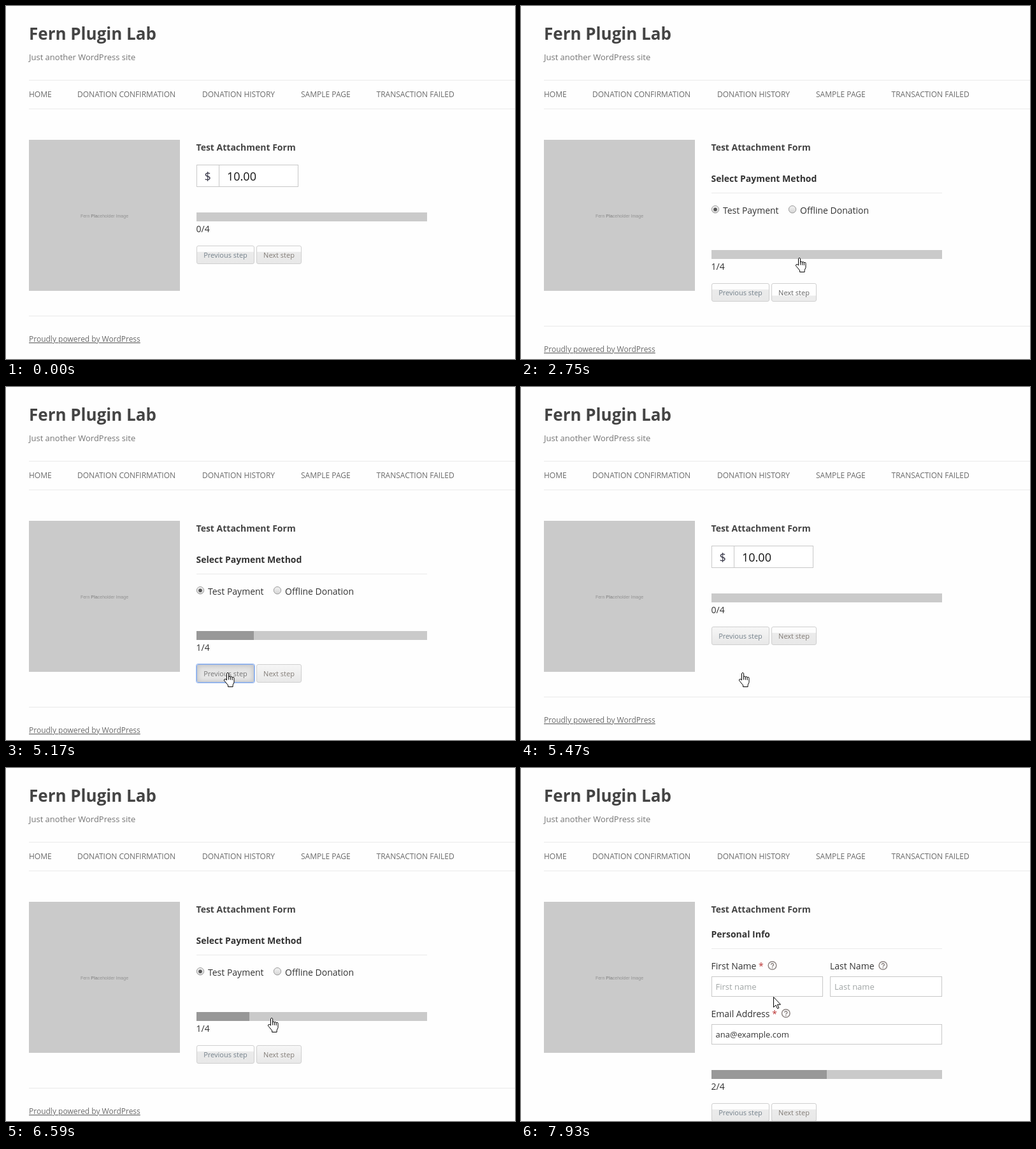
An HTML page that plays this animation: 799 px wide and 554 px high, repeating every 8 s.

```html
<!DOCTYPE html>
<html lang="en">
<head>
<meta charset="utf-8">
<title>Multi-step donation form</title>
<style>
:root {
  --idle: linear-gradient(#fdfdfd 31%, #ebebeb 34%, #e8e8e8);
  --lit: linear-gradient(#fefefe 67%, #ececec 70%);
  --hover: linear-gradient(#f6f6f6, #e8e8e8);
  --down: linear-gradient(#e1e1e1, #ebebeb);
  --ring: 0 0 0 1px #a4c0f0, inset 0 0 7px 2px #c6c6c6;
}
html, body { margin: 0; width: 100%; height: 100%; overflow: hidden; background: #fefefe; }
body { position: relative; font-family: "Open Sans", sans-serif; }
svg { position: absolute; left: 0; top: 0; overflow: visible; }
text { font-size: 14px; fill: #333; white-space: pre; }
line { stroke: #eaeaea; }
.title { font-size: 26px; font-weight: 700; fill: #444; }
.tagline { font-size: 13px; fill: #757575; }
.nav text, .foot { font-size: 12px; fill: #6a6a6a; }
.foot { text-decoration: underline; }
.bold { font-weight: 700; }
.amount { font-size: 18px; fill: #111; }
.field { fill: #fff; stroke: #c8c8c8; }
.value { font-size: 13px; }
.hint { font-size: 13px; fill: #a0a5a5; }
.req { fill: #b33; }
.tip { fill: none; stroke: #8d8583; stroke-width: 1.5; }

/* Every change is a hard cut over one 8 s loop */
.page, .controls, .fill, .btn, .cursor, .cursor g { animation: 8s step-end infinite; }
.page { opacity: 0; }
.amount-page { animation-name: amountPage; }
.method-page { animation-name: methodPage; }
.info-page { animation-name: infoPage; }
@keyframes amountPage { 0%, 66.5% { opacity: 1 } 34.375%, 80.875% { opacity: 0 } }
@keyframes methodPage { 0%, 66.5%, 92.25% { opacity: 0 } 34.375%, 80.875% { opacity: 1 } }
@keyframes infoPage { 0% { opacity: 0 } 92.25% { opacity: 1 } }

.controls { position: absolute; left: 299px; top: 324px; animation-name: shift; }
@keyframes shift {
  0%, 66.5% { transform: none }
  34.375%, 80.875% { transform: translateY(59px) }
  92.25% { transform: translateY(150px) }
}
.bar { width: 362px; height: 14px; background: #cacaca; }
.fill { height: 100%; width: 0; background: #989898; animation-name: progress; }
@keyframes progress {
  0%, 34.375%, 68.375%, 80.875% { width: 0 }
  35.875%, 82.375% { width: 83px }
  37.75%, 84% { width: 90px }
  66.5% { width: 26px }
  92.25% { width: 96px }
  94.125% { width: 173px }
  95.625% { width: 181px }
}
.btn {
  position: absolute; top: 52px; height: 29px; box-sizing: border-box;
  border: 1px solid #cfcfcf; border-radius: 3px; background: var(--idle);
  color: #7c7c7c; font-size: 11px; line-height: 27px; text-align: center; white-space: nowrap;
}
.prev { left: 0; width: 91px; color: #74818b; animation-name: prev; }
.next { left: 94px; width: 71px; color: #827c76; animation-name: next; }
@keyframes prev {
  0%, 23.875%, 80.875% { background: var(--idle); color: #74818b; border-color: #cfcfcf; box-shadow: none }
  17.375%, 56.125% { background: var(--hover); color: #5e6670; border-color: #cfcfcf; box-shadow: none }
  34.375% { background: var(--idle); color: #74818b; border-color: #cfcfcf; box-shadow: none }
  64.625% { background: var(--down); color: #757575; border-color: #86abea; box-shadow: var(--ring) }
  66.5% { background: var(--hover); color: #74818b; border-color: #cfcfcf; box-shadow: none }
}
@keyframes next {
  0%, 66.5%, 92.25% { background: var(--idle); color: #827c76; border-color: #cfcfcf; box-shadow: none }
  23.875%, 77.125%, 85.5% { background: var(--hover); color: #5e5e5e; border-color: #cfcfcf; box-shadow: none }
  34.375% { background: var(--lit); color: #666; border-color: #cfcfcf; box-shadow: none }
  35.875%, 80.875% { background: var(--hover); color: #827c76; border-color: #cfcfcf; box-shadow: none }
  79%, 90.75% { background: var(--down); color: #827c76; border-color: #86abea; box-shadow: var(--ring) }
}

.cursor { animation-name: move; }
@keyframes move {
  0% { transform: translate(385px, 600px) }
  10.5% { transform: translate(385px, 487px) }
  12% { transform: translate(380px, 471px) }
  13.5% { transform: translate(375px, 456px) }
  15.375% { transform: translate(368px, 401px) }
  17.375% { transform: translate(374px, 402px) }
  22.25% { transform: translate(398px, 396px) }
  23.875% { transform: translate(417px, 397px) }
  25.375% { transform: translate(434px, 399px) }
  27.125% { transform: translate(435px, 398px) }
  29.125% { transform: translate(436px, 395px) }
  50.125% { transform: translate(430px, 399px) }
  51.625% { transform: translate(413px, 411px) }
  53.125% { transform: translate(391px, 425px) }
  54.625% { transform: translate(369px, 437px) }
  56.125% { transform: translate(354px, 445px) }
  57.625% { transform: translate(347px, 448px) }
  72.25% { transform: translate(347px, 424px) }
  74.125% { transform: translate(361px, 416px) }
  75.625% { transform: translate(391px, 403px) }
  77.125% { transform: translate(416px, 392px) }
  85.5% { transform: translate(419px, 440px) }
  87.375% { transform: translate(424px, 444px) }
  88.875% { transform: translate(427px, 446px) }
  99.125% { transform: translate(396px, 359px) }
}
.cursor g { stroke: #000; fill: #fff; stroke-linejoin: round; }
.cursor .arrow { animation-name: arrow; }
.cursor .hand { animation-name: hand; }
.cursor .beam { fill: none; animation-name: beam; }
@keyframes arrow {
  0%, 41.25%, 72.25%, 99.125% { opacity: 1 }
  17.375%, 56.125%, 77.125% { opacity: 0 }
}
@keyframes hand {
  0%, 22.25%, 41.25%, 72.25%, 99.125% { opacity: 0 }
  17.375%, 23.875%, 56.125%, 77.125% { opacity: 1 }
}
@keyframes beam { 0%, 23.875% { opacity: 0 } 22.25% { opacity: 1 } }
</style>
</head>
<body>
<svg width="799" height="554">
  <defs>
    <linearGradient id="knob" x2="0" y2="1">
      <stop stop-color="#f4f4f4"/><stop offset="1" stop-color="#d4d4d4"/>
    </linearGradient>
    <g id="help">
      <circle class="tip" r="6.3"/>
      <path class="tip" d="M-2-1.2a2 2 0 1 1 3 1.6q-1 .5-1 1.4M0 2.8v1.4"/>
    </g>
    <circle id="radio" r="5.7" fill="url(#knob)" stroke="#9a9a9a"/>
  </defs>

  <text class="title" x="36" y="53">Fern Plugin Lab</text>
  <text class="tagline" x="36" y="85">Just another WordPress site</text>
  <line x1="36" x2="799" y1="116.5" y2="116.5"/>
  <line x1="36" x2="799" y1="161.5" y2="161.5"/>
  <g class="nav">
    <text x="36" y="143">HOME</text>
    <text x="112" y="143">DONATION CONFIRMATION</text>
    <text x="308" y="143">DONATION HISTORY</text>
    <text x="463" y="143">SAMPLE PAGE</text>
    <text x="581.5" y="143">TRANSACTION FAILED</text>
  </g>
  <rect x="36" y="210" width="237" height="237" fill="#cacaca"/>
  <text x="154.5" y="332" text-anchor="middle" style="font: 7px 'Liberation Sans', sans-serif; fill: #929292">Fern <tspan class="bold">Pla</tspan>ceholder Image</text>
  <text class="bold" x="298.5" y="227" style="fill: #444">Test Attachment Form</text>

  <g class="page amount-page">
    <rect class="field" x="299.5" y="249.5" width="159" height="34"/>
    <line x1="334.5" x2="334.5" y1="250" y2="283" style="stroke: #c8c8c8"/>
    <text class="amount" x="311.5" y="274" style="fill: #333344">$</text>
    <text class="amount" x="347" y="274">10.00</text>
    <text x="298.5" y="355">0/4</text>
    <line x1="36" x2="799" y1="486.5" y2="486.5"/>
    <text class="foot" x="36" y="527">Proudly powered by WordPress</text>
  </g>

  <g class="page method-page">
    <text class="bold" x="298.5" y="276">Select Payment Method</text>
    <line x1="299" x2="661" y1="293.5" y2="293.5"/>
    <use href="#radio" x="305" y="319.2"/>
    <circle cx="305" cy="319.2" r="2.8" fill="#555"/>
    <text x="317" y="326">Test Payment</text>
    <use href="#radio" x="426" y="319.2"/>
    <text x="438" y="326">Offline Donation</text>
    <text x="298.5" y="414">1/4</text>
    <line x1="36" x2="799" y1="502.5" y2="502.5"/>
    <text class="foot" x="36" y="543">Proudly powered by WordPress</text>
  </g>

  <g class="page info-page">
    <text class="bold" x="298.5" y="266">Personal Info</text>
    <line x1="299" x2="661" y1="283.5" y2="283.5"/>
    <text x="298.5" y="316">First Name <tspan class="req">*</tspan></text>
    <use href="#help" x="394.5" y="310"/>
    <text x="485" y="316">Last Name</text>
    <use href="#help" x="568.3" y="310"/>
    <rect class="field" x="299.5" y="327.5" width="174" height="31"/>
    <rect class="field" x="485.5" y="327.5" width="175" height="31"/>
    <text class="hint" x="305.5" y="348">First name</text>
    <text class="hint" x="492" y="348">Last name</text>
    <text x="298.5" y="391">Email Address <tspan class="req">*</tspan></text>
    <use href="#help" x="415.8" y="385"/>
    <rect class="field" x="299.5" y="402.5" width="361" height="31"/>
    <text class="value" x="305.5" y="423">ana@example.com</text>
    <text x="298.5" y="505">2/4</text>
  </g>
</svg>

<div class="controls">
  <div class="bar"><div class="fill"></div></div>
  <div class="btn prev">Previous step</div>
  <div class="btn next">Next step</div>
</div>

<svg class="cursor" width="24" height="28">
  <g class="arrow"><path d="M.5.5v16l3.6-3.4 2.5 5.5 2.3-1-2.4-5.4h5z"/></g>
  <g class="hand" transform="translate(-6 -1)">
    <path d="M5.5 13V2.7a1.6 1.6 0 0 1 3.1 0V8.2a1.4 1.4 0 0 1 2.8.5 1.4 1.4 0 0 1 2.8.7 1.4 1.4 0 0 1 2.8 1V16.5l-1.9 4.2V23.5H7.6V21L2 14.3a1.6 1.6 0 0 1 2.3-2.4z"/>
    <path d="M8.6 8v4.5M11.4 8.7v4M14.2 9.4v3.6" fill="none"/>
  </g>
  <g class="beam">
    <path d="M-3-7.5h6M-3 8.5h6M.5-7v15" stroke="#fff" stroke-width="3"/>
    <path d="M-3-7.5h2.5l1 1 1-1H4M-3 8.5h2.5l1-1 1 1H4M.5-6.5v14"/>
  </g>
</svg>
</body>
</html>
```
